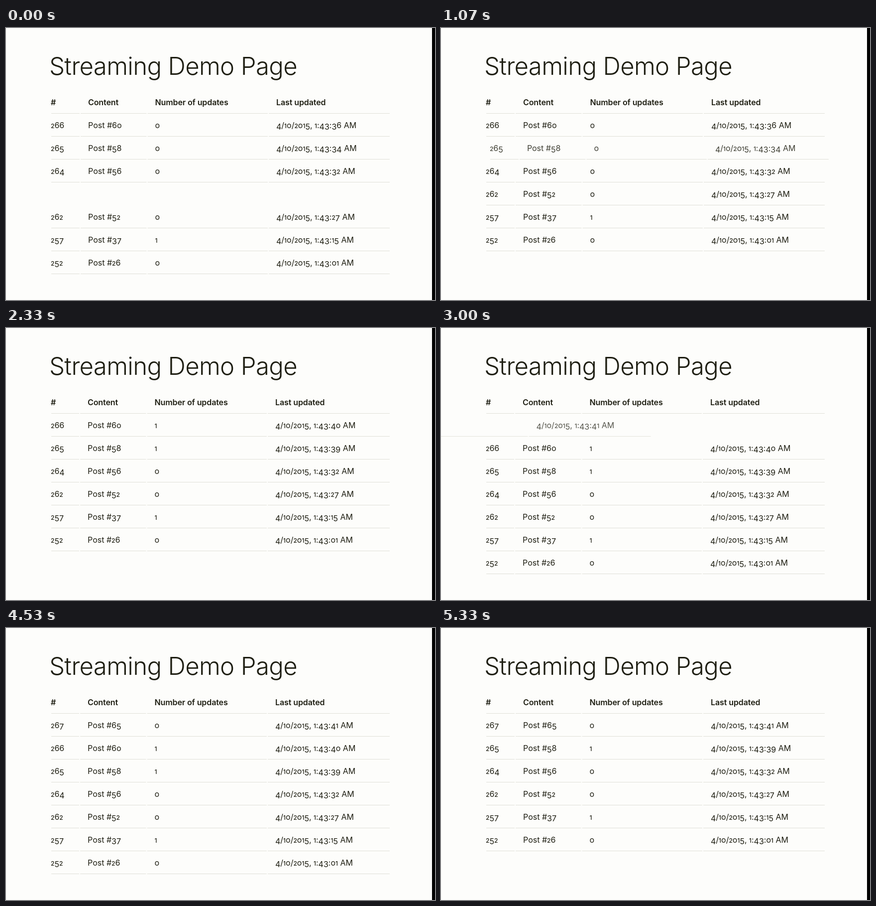
Animation, 862 px wide and 546 px high, one loop 5.39 s. Source, as an HTML page with a canvas:

```html
<!DOCTYPE html>
<html lang="en">
<head>
<meta charset="utf-8">
<title>Streaming Demo Page</title>
<style>
  html, body { margin: 0; width: 100%; height: 100%; overflow: hidden; background: #fdfdfb; }
  canvas { display: block; }
</style>
</head>
<body>
<canvas id="stage" width="862" height="546"></canvas>
<script>
const ctx = document.getElementById('stage').getContext('2d');
const LOOP = 5390, TICK = 1000 / 15;
const PAGE = '#fdfdfb', INK = '#1e1e12', RULE = '#e0e0d8';
const ROW = 46, HEAD_BASE = 155, LEFT = 91, RIGHT = 771;
const SHAKE = 500, ENTER = 1000, LEAVE = 1000, REMOVE = 530;

// Times in ms: when a row enters, shakes (then shows its update) or leaves.
const rows = [
  { id: 267, post: 65, count: 0, sec: '41', enter: 2699 },
  { id: 266, post: 60, count: 0, sec: '36', shake: 1798, next: '40', leave: 4700 },
  { id: 265, post: 58, count: 0, sec: '34', shake: 886, next: '39' },
  { id: 264, post: 56, count: 0, sec: '32' },
  { id: 263, post: 54, count: 0, sec: '30', leave: -400 },
  { id: 262, post: 52, count: 0, sec: '27' },
  { id: 257, post: 37, count: 1, sec: '15' },
  { id: 252, post: 26, count: 0, sec: '01' }
];

function bezier(x1, y1, x2, y2) {
  const curve = (a, b, u) => 3 * a * u * (1 - u) ** 2 + 3 * b * u * u * (1 - u) + u ** 3;
  return x => {
    let lo = 0, hi = 1;
    for (let i = 0; i < 24; i++) {
      const mid = (lo + hi) / 2;
      if (curve(x1, x2, mid) < x) lo = mid; else hi = mid;
    }
    return curve(y1, y2, lo);
  };
}
const ease = bezier(.25, .1, .25, 1);
const easeOut = bezier(.215, .61, .355, 1);

// Each key is [position, x, opacity]; easing applies between neighbours.
function keyframes(keys, p, timing) {
  const i = Math.max(1, keys.findIndex(k => k[0] >= p));
  const a = keys[i - 1], b = keys[i];
  const e = timing((p - a[0]) / (b[0] - a[0]));
  return { x: a[1] + (b[1] - a[1]) * e, alpha: a[2] + (b[2] - a[2]) * e };
}
const bounceIn = [[0, -3000, 0], [.6, 25, 1], [.75, -10, 1], [.9, 5, 1], [1, 0, 1]];
const bounceOut = [[0, 0, 1], [.2, -20, 1], [1, 2000, 0]];
const shake = Array.from({ length: 11 }, (_, i) =>
  [i / 10, i % 10 ? (i % 2 ? -10 : 10) : 0, 1]);

function pose(row, t) {
  const during = (start, length) => t >= start && t < start + length;
  if (during(row.enter, ENTER)) return keyframes(bounceIn, (t - row.enter) / ENTER, easeOut);
  if (during(row.shake, SHAKE)) return keyframes(shake, (t - row.shake) / SHAKE, ease);
  if (during(row.leave, LEAVE)) return keyframes(bounceOut, (t - row.leave) / LEAVE, ease);
  return null;
}

function columnsAt(t) {
  if (t < 1798 + SHAKE) return [90, 165, 299.5, 543];
  if (t < 4700 + REMOVE) return [90, 164, 298.5, 541];
  return [90, 165, 298.5, 542];
}

function setFont(weight, size, spacing = 0) {
  ctx.font = `${weight} ${size}px Inter, "Open Sans", sans-serif`;
  ctx.letterSpacing = spacing + 'px';
}

// Old-style figures: round zero, 1 and 2 at x-height, 3 4 5 7 9 dropped.
function drawText(text, x, y) {
  for (const run of text.match(/0+|[12]+|[34579]+|[^0-579]+/g)) {
    const small = /[12]/.test(run), low = /[34579]/.test(run);
    setFont(small ? 500 : 400, small ? 12 : 16);
    const glyphs = run.replace(/0/g, 'o');
    ctx.fillText(glyphs, x, y + (low ? 3 : 0));
    x += ctx.measureText(glyphs).width;
  }
}

function drawRule(columns, y) {
  ctx.fillStyle = RULE;
  columns.forEach((col, i) => {
    const from = i ? col - 15 : LEFT;
    const to = i < 3 ? columns[i + 1] - 17 : RIGHT;
    ctx.fillRect(from, y, to - from, 1);
  });
}

function drawRow(row, t, columns, base) {
  const move = pose(row, t);
  const updated = t >= row.shake + SHAKE;
  const cells = [
    `${row.id}`,
    `Post #${row.post}`,
    `${row.count + (updated ? 1 : 0)}`,
    `4/10/2015, 1:43:${updated ? row.next : row.sec} AM`
  ];
  ctx.save();
  if (move) {
    ctx.translate(move.x, 0);
    ctx.globalAlpha = move.alpha;
  }
  drawRule(columns, base + 16);
  if (move) ctx.globalAlpha *= .85;
  ctx.fillStyle = INK;
  cells.forEach((text, i) => drawText(text, columns[i], base));
  ctx.restore();
}

function draw(t) {
  const columns = columnsAt(t);
  ctx.fillStyle = PAGE;
  ctx.fillRect(0, 0, 862, 546);

  ctx.fillStyle = INK;
  setFont(300, 49, -.6);
  ctx.fillText('Streaming Demo Page', 87, 94);
  setFont(600, 16, -.1);
  ['#', 'Content', 'Number of updates', 'Last updated']
    .forEach((text, i) => ctx.fillText(text, columns[i], HEAD_BASE));
  drawRule(columns, HEAD_BASE + 16);

  rows.filter(row => !(t < row.enter) && !(t >= row.leave + REMOVE))
    .forEach((row, i) => drawRow(row, t, columns, HEAD_BASE + ROW * (i + 1)));

  ctx.fillStyle = '#000';
  ctx.fillRect(856, 0, 6, 546);
}

function loop() {
  const t = performance.now() % LOOP;
  draw(Math.floor((t + 4) / TICK) * TICK);
  requestAnimationFrame(loop);
}
loop();
</script>
</body>
</html>
```
